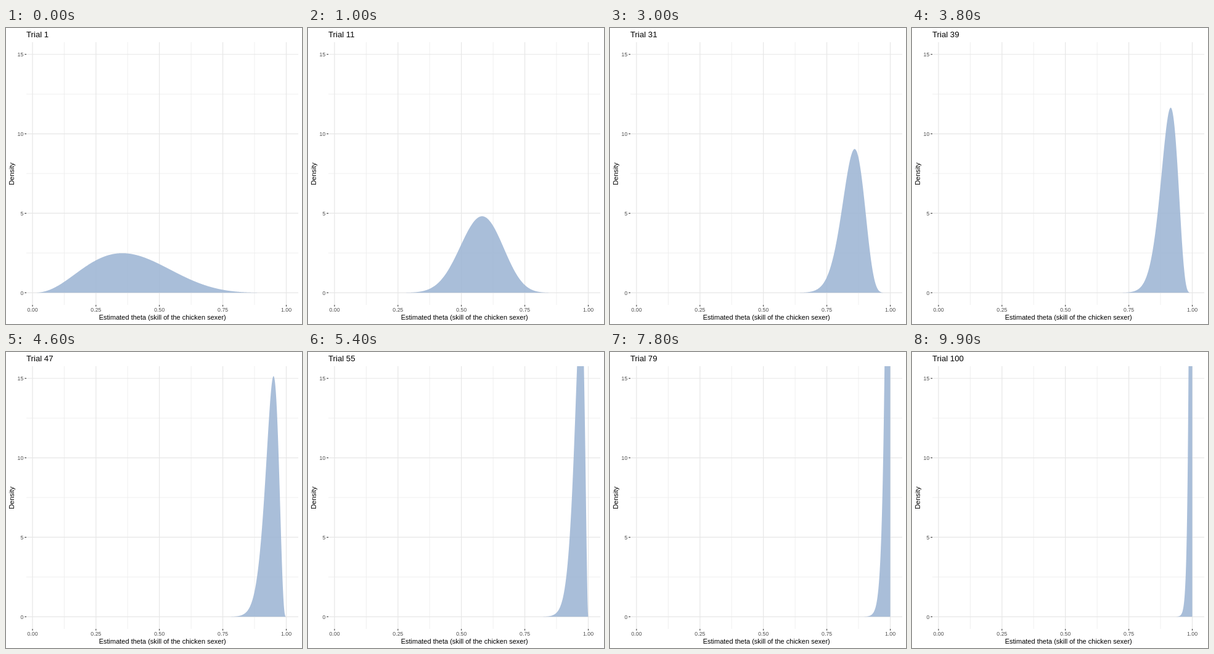
These frames come from a looping animation (480x480 px, 10000 ms). An HTML page:

```html
<!DOCTYPE html>
<html lang="en">
<head>
<meta charset="utf-8">
<title>Density by trial</title>
<style>
  html, body { margin: 0; width: 100%; height: 100%; overflow: hidden; background: #fff; }
  svg { display: block; width: 480px; height: 480px; font-family: "Liberation Sans", Arial, sans-serif; }
  .major { stroke: #e6e6e6; stroke-width: 1.2; }
  .minor { stroke: #ebebeb; stroke-width: .8; }
  .tick { stroke: #333; stroke-width: 1.07; }
  .label { font-size: 8.8px; fill: #4d4d4d; }
  .axis { font-size: 11px; text-anchor: middle; }
</style>
</head>
<body>
<svg viewBox="0 0 480 480">
  <clipPath id="panel"><rect x="33" y="23" width="441" height="426"/></clipPath>
  <g id="grid"></g>
  <g clip-path="url(#panel)"><path id="area" fill="#a0b7d5" fill-opacity=".9"/></g>
  <text id="title" x="33" y="15" font-size="13.2"></text>
  <text class="axis" x="253.7" y="473">Estimated theta (skill of the chicken sexer)</text>
  <text class="axis" transform="translate(13.2 236.5) rotate(-90)">Density</text>
</svg>
<script>
const $ = id => document.getElementById(id);
const px = theta => 43 + 411.5 * theta;
const py = density => 429.3 - 25.77 * density;

// Grid, ticks and tick labels
const line = (cls, x1, y1, x2, y2) =>
  `<line class="${cls}" x1="${x1}" y1="${y1}" x2="${x2}" y2="${y2}"/>`;
const label = (x, y, anchor, s) =>
  `<text class="label" x="${x}" y="${y}" text-anchor="${anchor}">${s}</text>`;
let minor = '', major = '';
for (let i = 0; i < 9; i++) {
  const x = px(i / 8);
  if (i % 2) minor += line('minor', x, 23, x, 449);
  else major += line('major', x, 23, x, 449) + line('tick', x, 449, x, 451.7)
    + label(x, 460, 'middle', (i / 8).toFixed(2));
}
for (let i = 0; i < 7; i++) {
  const y = py(i * 2.5);
  if (i % 2) minor += line('minor', 33, y, 474, y);
  else major += line('major', 33, y, 474, y) + line('tick', 30.3, y, 33, y)
    + label(28.3, y + 3.2, 'end', i * 2.5);
}
$('grid').innerHTML = minor + major;

// Beta distribution whose mean and concentration grow with the trial number
const STEPS = 1000;
function betaPath(trial) {
  const mean = 1 / (1 + Math.exp(.55 - .081 * trial + .00025 * trial ** 2));
  const u = trial - 47;
  const concentration = 72 + .437 * u + .000436 * u ** 3;
  const a = mean * concentration - 1, b = (1 - mean) * concentration - 1;

  const thetas = Array.from({ length: STEPS }, (_, i) => (i + .5) / STEPS);
  const logs = thetas.map(t => a * Math.log(t) + b * Math.log(1 - t));
  const top = Math.max(...logs);
  const weights = logs.map(l => Math.exp(l - top));
  const total = weights.reduce((sum, w) => sum + w) / STEPS;

  const points = thetas.map((t, i) => `${px(t).toFixed(2)} ${py(weights[i] / total).toFixed(2)}`);
  return `M${px(0)} ${py(0)}L${points.join(' ')}H${px(1)}V${py(0)}Z`;
}

let shown = 0;
function draw() {
  const trial = Math.floor(performance.now() % 10000 / 100) + 1;
  if (trial !== shown) {
    shown = trial;
    $('title').textContent = `Trial ${trial}`;
    $('area').setAttribute('d', betaPath(trial));
  }
  requestAnimationFrame(draw);
}
draw();
</script>
</body>
</html>
```
